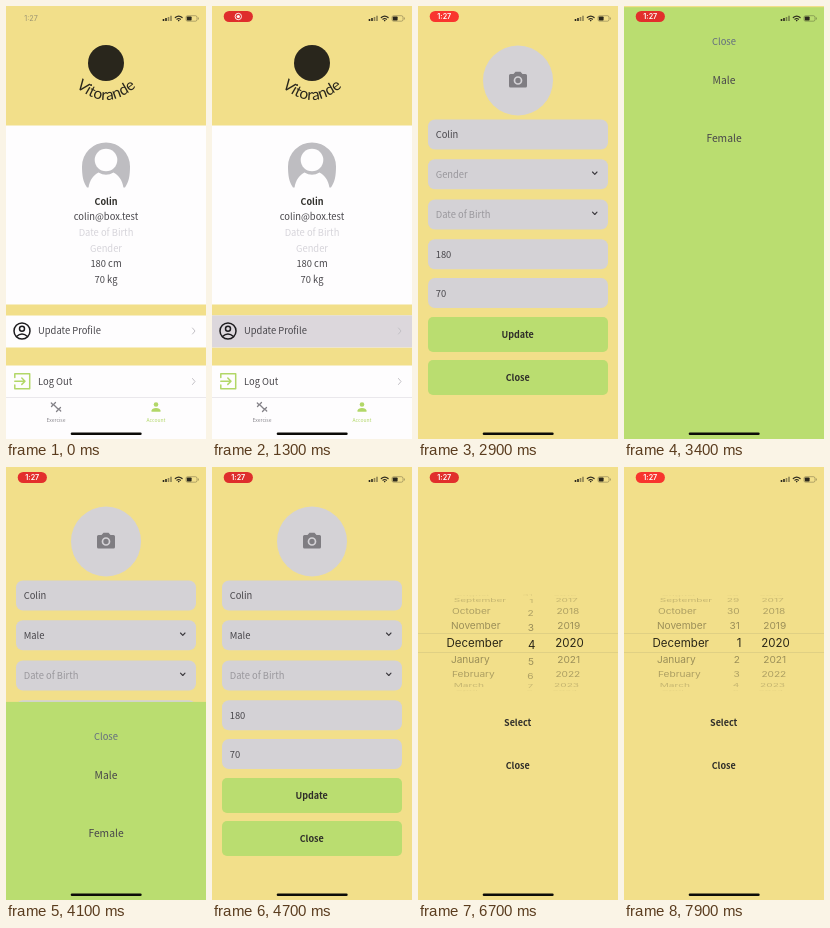
Animation, 200 px wide and 433 px high, one loop 8 s. Source, as an HTML page:

```html
<!DOCTYPE html>
<html lang="en">
<head>
<meta charset="utf-8">
<title>Profile update</title>
<style>
  html, body { margin: 0; width: 100%; height: 100%; overflow: hidden; background: #f2df8a; }
  svg { display: block; width: 100vw; height: 100vh; }
  text { font-family: "Noto Sans CJK JP", "Noto Sans CJK SC", "Noto Sans", sans-serif; font-size: 9.4px; fill: #48464b; }
  .mid { text-anchor: middle; }
  .bold { font-weight: 700; font-size: 9px; fill: #2e2d29; }
  .hint { fill: #d6d4da; }
  .tab { font-size: 5px; }
  .choice { font-size: 10.3px; }
  .wheel text { font-family: Inter, Roboto, sans-serif; font-size: 11.5px; fill: #2a2617; }
  .clock { font-family: Inter, Roboto, sans-serif; font-size: 7.2px; }
  .line { fill: none; stroke-linecap: round; stroke-linejoin: round; }
</style>
</head>
<body>
<svg viewBox="0 0 200 433" preserveAspectRatio="none">
  <g id="home">
    <rect width="200" height="433" fill="#fefdfe"/>
    <path d="M0 0H200V119.5H0ZM0 298.4H200V309.4H0ZM0 341.4H200V359.4H0Z" fill="#f2df8a"/>
    <circle cx="100" cy="57" r="18" fill="#29261c"/>
    <path id="arc" d="M68 79Q100 109 132 79" fill="none"/>
    <text class="mid" style="font:15.5px Lato,sans-serif;fill:#29261c"><textPath href="#arc" startOffset="50%">Vitorande</textPath></text>

    <path d="M81 181.500C77 176 76 169 76 160.500A24 24 0 0 1 124 160.500C124 169 123 176 119 181.500Z" fill="#bebdc1"/>
    <circle cx="100" cy="154" r="11.300" fill="#fefdfe"/>
    <path d="M82.500 182C83.500 174 88 168.500 92.500 166.500Q100 171 107.500 166.500C112 168.500 116.500 174 117.500 182Z" fill="#fefdfe"/>
    <text class="mid bold" x="100" y="198.500">Colin</text>
    <text class="mid" x="100" y="214">colin@box.test</text>
    <text class="mid hint" x="100" y="229.500">Date of Birth</text>
    <text class="mid hint" x="100" y="245.500">Gender</text>
    <text class="mid" x="100" y="261">180 cm</text>
    <text class="mid" x="100" y="276.500">70 kg</text>

    <rect id="row" y="309.400" width="200" height="32" fill="#dcd7dc"/>
    <g class="line" stroke="#1c1b1e" stroke-width="1.500">
      <circle cx="16" cy="325" r="8"/>
      <circle cx="16" cy="322.700" r="2.500"/>
      <path d="M10.500 330.500Q16 325.500 21.500 330.500"/>
    </g>
    <text x="32" y="328.300">Update Profile</text>
    <g class="line" stroke="#b2d768" stroke-width="1.500">
      <path d="M8.800 371.500V367.700H23.700V382.700H8.800V379M8.800 375.200H19M15.800 372L19 375.200L15.800 378.400"/>
    </g>
    <text x="32" y="378.700">Log Out</text>
    <path class="line" stroke="#c3c1c6" d="M186.500 322L189 325L186.500 328M186.500 372.500L189 375.500L186.500 378.500"/>

    <path d="M0 391.500H200" stroke="#eae8ec"/>
    <path class="line" stroke="#848288" stroke-width="1.300" d="M47.500 398.500L52.500 403.500M45.500 400.500L49.500 396.500M46.300 398L45.300 397M50.500 405.500L54.500 401.500M53.700 404L54.700 405"/>
    <text class="mid tab" x="50" y="415.700" style="fill:#8a888e">Exercise</text>
    <g fill="#b2d768">
      <circle cx="150" cy="398.500" r="2.300"/>
      <path d="M145.500 405.700V404.500Q146 402 150 402T154.500 404.500V405.700Z"/>
    </g>
    <text class="mid tab" x="150" y="415.700" style="fill:#b2d768">Account</text>
  </g>

  <g id="form">
    <rect width="200" height="434" fill="#f2df8a"/>
    <circle cx="100" cy="74.500" r="35" fill="#d4d2d6"/>
    <path fill="#7f7d82" d="M92.500 68H95.500L97.500 65.700H102.500L104.500 68H107.500Q109 68 109 69.500V80Q109 81.500 107.500 81.500H92.500Q91 81.500 91 80V69.500Q91 68 92.500 68Z"/>
    <circle cx="100" cy="74.500" r="3.500" fill="#7f7d82" stroke="#d4d2d6" stroke-width="1.700"/>
    <g id="fields"></g>
    <path class="line" stroke="#38363b" stroke-width="1.100" d="M174.500 166L176.800 168.300L179 166M174.500 206.200L176.800 208.500L179 206.200"/>
  </g>

  <g id="gender">
    <rect width="200" height="434" fill="#badd70"/>
    <text class="mid" x="100" y="38" style="fill:#626b80">Close</text>
    <text class="mid choice" x="100" y="77.300">Male</text>
    <text class="mid choice" x="100" y="135">Female</text>
  </g>

  <g id="picker">
    <rect width="200" height="434" fill="#f2df8a"/>
    <path d="M0 166.500H200M0 185.500H200" stroke="#dccd83" stroke-width=".8"/>
    <g id="wheels" class="wheel"></g>
    <text class="mid bold" x="99.700" y="258.700">Select</text>
    <text class="mid bold" x="99.700" y="302">Close</text>
  </g>

  <text id="time" class="clock mid" x="25" y="14.700" style="fill:#9b9472">1:27</text>
  <g id="pill">
    <rect id="pillBack" x="11.700" y="5" width="29.200" height="11" rx="5.500"/>
    <g id="record">
      <circle cx="26.300" cy="10.500" r="3.200" fill="none" stroke="#fff" stroke-width=".9"/>
      <circle cx="26.300" cy="10.500" r="1.600" fill="#fff"/>
    </g>
    <text id="pillTime" class="clock mid" x="26.300" y="13.100" style="fill:#fff;font-weight:600">1:27</text>
  </g>
  <g fill="#2b281d">
    <path d="M156.700 13H158.300V15H156.700ZM159.200 12H160.800V15H159.200Z"/>
    <path d="M161.700 11H163.300V15H161.700ZM164.200 9.800H165.800V15H164.200Z" opacity=".5"/>
    <path class="line" style="fill:none" stroke="#2b281d" stroke-width="1.200" d="M169.300 11.500Q172.700 8.700 176.100 11.500M170.900 13.200Q172.700 11.800 174.500 13.200"/>
    <circle cx="172.700" cy="14.600" r=".8"/>
    <rect x="180" y="9.700" width="11" height="5.500" rx="1.600" fill="none" stroke="#2b281d" stroke-opacity=".45" stroke-width=".7"/>
    <rect x="180.800" y="10.500" width="4.800" height="3.900" rx=".7"/>
    <rect x="191.900" y="11.500" width=".8" height="2" opacity=".45"/>
  </g>
  <rect x="64.700" y="426.500" width="71" height="2.500" rx="1.250" fill="#0c0b08"/>
</svg>
<script>
const LOOP = 8000, HEIGHT = 433;
const INK = '#48464b', FAINT = '#99979c';
const $ = id => document.getElementById(id);
const clamp = v => Math.min(1, Math.max(0, v));
const ramp = (t, from, to) => clamp((t - from) / (to - from));
const smooth = v => v * v * (3 - 2 * v);

function make(parent, tag, attrs, content = '') {
  const node = document.createElementNS('http://www.w3.org/2000/svg', tag);
  for (const key in attrs) node.setAttribute(key, attrs[key]);
  node.textContent = content;
  return parent.appendChild(node);
}

// Form fields and buttons
const inputs = [['Colin', 113.5], ['Gender', 153.2], ['Date of Birth', 193.5], ['180', 233.2], ['70', 272]]
  .map(([label, y], i) => {
    make($('fields'), 'rect', { x: 10, y, width: 180, height: 30, rx: 7, fill: '#d4d2d6' });
    const text = make($('fields'), 'text', { x: 17.7, y: y + 18.6 }, label);
    if (i === 1 || i === 2) text.style.fill = FAINT;
    return text;
  });
[['Update', 311], ['Close', 354]].forEach(([label, y]) => {
  make($('fields'), 'rect', { x: 10, y, width: 180, height: 35, rx: 5, fill: '#badd70' });
  make($('fields'), 'text', { x: 99.7, y: y + 20.8, class: 'mid bold' }, label);
});

// Date wheels
const MONTHS = ['January', 'February', 'March', 'April', 'May', 'June', 'July',
  'August', 'September', 'October', 'November', 'December'];
const wrap = (n, size) => ((n % size) + size) % size;
const wheels = [
  { x: 32.5, big: 28.5, anchor: 'start', label: n => MONTHS[wrap(n, 12)] },
  { x: 116, big: 117.5, anchor: 'end', label: n => wrap(n - 1, 31) + 1 },
  { x: 151, big: 151.5, anchor: 'middle', label: n => n }
];
for (const wheel of wheels) {
  wheel.rows = Array.from({ length: 9 }, () => make($('wheels'), 'text', { 'text-anchor': wheel.anchor }));
}

function turn(wheel, position) {
  const base = Math.round(position);
  wheel.rows.forEach((row, i) => {
    const n = base + i - 4, offset = n - position, angle = offset * 0.36;
    const depth = Math.cos(angle), centred = Math.abs(offset) < 0.5;
    const scale = centred ? 1 : 0.88;
    const x = centred ? wheel.big : 100 + (wheel.x - 100) * (1 - 0.09 * (1 - depth));
    const y = 176 + 48 * Math.sin(angle);
    row.textContent = wheel.label(n);
    row.setAttribute('transform', `translate(${x} ${y}) scale(${scale} ${scale * Math.max(depth, 0)}) translate(0 4.1)`);
    row.setAttribute('opacity', centred ? 1 : Math.max(0, 0.46 * depth));
  });
}

// Critically damped slide: 1 at the start, settling at 0
function settle(t, start, speed = 18) {
  const p = Math.max(0, t - start) / 1000 * speed;
  return (1 + p) * Math.exp(-p);
}

function place(id, hidden) {
  $(id).setAttribute('transform', `translate(0 ${HEIGHT * hidden})`);
  $(id).style.display = hidden > 0.999 ? 'none' : '';
}

function draw(t) {
  $('row').setAttribute('opacity', t < 1500 ? ramp(t, 1100, 1200) : 0);
  place('form', settle(t, 1310, 32));
  place('gender', t < 4000 ? settle(t, 2950) : 1 - settle(t, 4000));
  place('picker', settle(t, 5050));

  const chosen = t >= 3950;
  inputs[1].textContent = chosen ? 'Male' : 'Gender';
  inputs[1].style.fill = chosen ? INK : FAINT;

  turn(wheels[0], 11);
  turn(wheels[1], 4 - 3 * smooth(ramp(t, 6600, 7500)));
  turn(wheels[2], 2020);

  const shown = ramp(t, 300, 600), toTime = ramp(t, 2200, 2450);
  const glow = 0.5 + 0.5 * Math.cos((t - 220) / 690 * 2 * Math.PI);
  $('time').setAttribute('opacity', 1 - shown);
  $('pill').setAttribute('opacity', shown);
  $('pillBack').setAttribute('fill', `rgb(${222 + 31 * glow} ${46 + 8 * glow} ${44 + 2 * glow})`);
  $('record').setAttribute('opacity', 1 - toTime);
  $('pillTime').setAttribute('opacity', toTime);
}

const began = performance.now();
function tick() {
  draw((performance.now() - began) % LOOP);
  requestAnimationFrame(tick);
}
tick();
</script>
</body>
</html>
```
